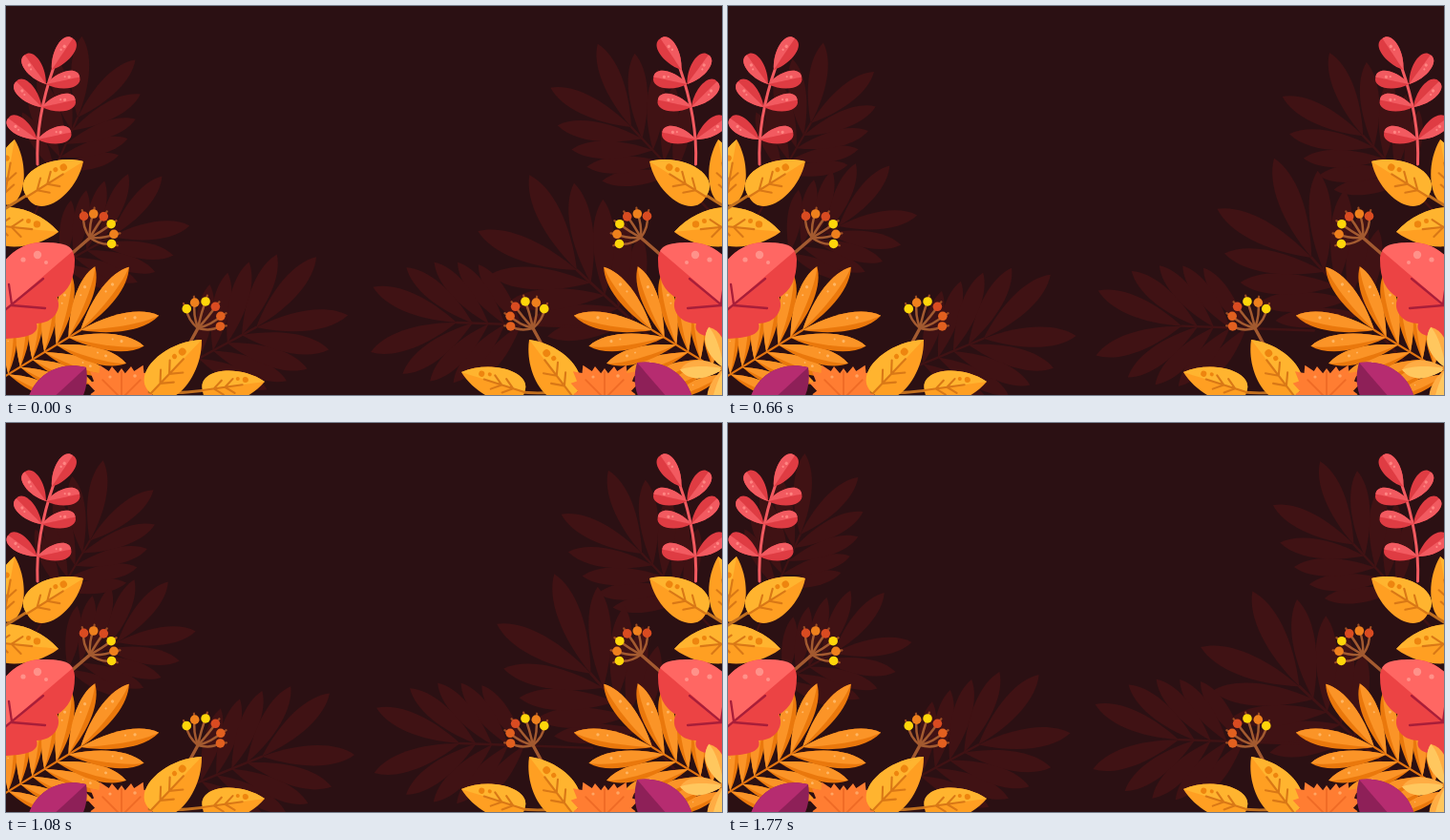
These frames come from a looping animation (750x408 px, 1.8 s). An HTML page with a canvas:

```html
<!DOCTYPE html>
<html lang="en">
<head>
<meta charset="utf-8">
<title>Autumn leaves</title>
<style>
html, body { margin: 0; width: 100%; height: 100%; overflow: hidden; background: #2b1013; }
canvas { display: block; width: 750px; height: 408px; }
</style>
</head>
<body>
<canvas id="stage" width="750" height="408"></canvas>
<script>
const W = 750, H = 408, LOOP = 1800, STEP = 30;
const RAD = Math.PI / 180;
const stage = document.getElementById('stage').getContext('2d');
const front = document.createElement('canvas');
front.width = W;
front.height = H;
let g = stage;

// Leaf outlines: where the two curve handles sit along the length
const LANCE = [0.42, 0.8], OVATE = [-0.04, 0.62], BLADE = [0.25, 0.75], DROP = [0.42, 1.02];

const RED = '#d94b21', RUST = '#e2601f', ORANGE = '#ee801d', YELLOW = '#ffd60a';
const CORAL = { light: '#f25a60', dark: '#df3c43', spot: '#ff8582', cut: 0 };
const GOLD = { light: '#ffb42f', dark: '#ff9f22', spot: '#ee850f', cut: 0 };
const PUMPKIN = { light: '#fb9427', dark: '#ea780c', spot: '#ffb663', cut: 0.4, stem: '#e37410' };
const CREAM = { light: '#ffc75e', dark: '#ffac43', cut: 0.3 };
const PLUM = { light: '#b62c70', dark: '#8e2058', cut: 0 };
const SHADOW = { dark: '#401214', stem: '#401214' };

function stroke(path, color, width) {
  g.strokeStyle = color;
  g.lineWidth = width;
  g.lineCap = g.lineJoin = 'round';
  g.stroke(new Path2D(path));
}

function fill(path, color) {
  g.fillStyle = color;
  g.fill(new Path2D(path));
}

function dot(x, y, r, color) {
  g.beginPath();
  g.arc(x, y, r, 0, 7);
  g.fillStyle = color;
  g.fill();
}

// Draws with the origin at (x, y) and the x axis along the angle
function at(x, y, angle, draw) {
  g.save();
  g.translate(x, y);
  g.rotate(angle);
  draw();
  g.restore();
}

function mirrored(sum, draw) {
  draw();
  g.save();
  g.translate(sum, 0);
  g.scale(-1, 1);
  draw();
  g.restore();
}

// Leaf along +x; the lit part covers one side and a share (cut) of the other
function blade(L, w, [a, b], { light, dark, spot, cut }, lit = -1) {
  const h = w * 0.667;
  const shape = (up, down) => `M0 0C${a * L} ${up} ${b * L} ${up} ${L} 0C${b * L} ${down} ${a * L} ${down} 0 0Z`;
  fill(shape(-h, h), dark);
  if (light) fill(shape(lit * h, -lit * h * cut), light);
  if (spot) {
    dot(L * 0.7, lit * w * 0.14, w * 0.09, spot);
    dot(L * 0.58, lit * w * 0.2, w * 0.06, spot);
  }
}

function leaf(x0, y0, x1, y1, w, shape, tone, lit) {
  const L = Math.hypot(x1 - x0, y1 - y0);
  at(x0, y0, Math.atan2(y1 - y0, x1 - x0), () => blade(L, w, shape, tone, lit));
}

function goldLeaf(x0, y0, x1, y1, w, lit = -1) {
  const L = Math.hypot(x1 - x0, y1 - y0);
  at(x0, y0, Math.atan2(y1 - y0, x1 - x0), () => {
    blade(L, w, OVATE, GOLD, lit);
    let veins = `M0 0H${L * 0.64}`;
    for (const s of [0.18, 0.36])
      for (const side of [-1, 1]) veins += `M${L * s} 0l${L * 0.14} ${side * w * 0.22}`;
    stroke(veins, '#d97816', 2.1);
  });
}

// Pairs of leaflets from the tip of the stem (origin) back along it,
// opening wider and getting shorter
function frond(size, stem, pairs, tone) {
  g.scale(size, size);
  stroke(`M${-stem} 0H0`, tone.stem, 2.4);
  for (let i = pairs - 1; i >= 0; i--) {
    const spread = (55 - 34 * 0.5 ** i) * RAD, L = 96 - 4.5 * i;
    for (const side of [-1, 1])
      at(-17 * i, 0, side * spread, () => blade(L, L * 0.22, LANCE, tone));
  }
}

// Each frond either turns about its stem's foot or slides
const TURN = 8 * RAD;
const fronds = [
  { x: 75, y: 117, angle: -66, size: 0.89, stem: 144, turn: TURN },
  { x: 110, y: 242, angle: -29, size: 0.865, stem: 130, dx: 8, dy: -15 },
  { x: 262, y: 337, angle: -28.5, size: 1.01, stem: 126, turn: TURN },
  { x: 655, y: 127, angle: -133, size: 0.98, stem: 140, dx: 14, dy: 12.5 },
  { x: 598, y: 277, angle: -137.5, size: 1.16, stem: 157, turn: TURN },
  { x: 472, y: 332, angle: -178, size: 0.99, stem: 140, dx: 4.5, dy: 5 }
];

function sway({ x, y, angle, size, stem, turn = 0, dx = 0, dy = 0 }, p) {
  const reach = stem * size;
  at(x + dx * p, y + dy * p, angle * RAD, () => {
    g.translate(-reach, 0);
    g.rotate(turn * p);
    g.translate(reach, 0);
    frond(size, stem, 5, SHADOW);
  });
}

function twig() {
  stroke('M33 166Q31 118 50 64', CORAL.light, 3);
  leaf(48, 67, 70, 34, 19, DROP, CORAL);
  for (let i = 0; i < 3; i++) {
    const x = 42 - 4.5 * i, y = 82 + 24 * i + 5 * i * (i - 1);
    at(x, y, (-126 - 9 * i) * RAD, () => blade(38, 18, DROP, CORAL));
    at(x, y, -12 * RAD, () => blade(36, 18, DROP, CORAL));
  }
}

function berries(x, y, foot, from, to, bulge, colors) {
  stroke(`M${foot}L${x} ${y}`, '#a35a30', 3.4);
  colors.forEach((color, i) => {
    const k = i / (colors.length - 1), a = (from + (to - from) * k) * RAD;
    const r = 23.5 + bulge * Math.sin(Math.PI * k), mid = a + (0.5 - k) * 0.7;
    const cx = Math.cos(a), cy = -Math.sin(a);
    const bx = x + r * cx, by = y + r * cy;
    stroke(`M${x} ${y}Q${x + r * 0.6 * Math.cos(mid)} ${y - r * 0.6 * Math.sin(mid)} ${bx} ${by}`, '#a35a30', 2.5);
    stroke(`M${bx} ${by}l${cx * 6.5} ${cy * 6.5}`, '#9b4c23', 2.2);
    dot(bx, by, 4.8, color);
  });
}

function goldBranch() {
  goldLeaf(-3, 208, 9, 140, 34);
  goldLeaf(-22, 229, 55, 237, 41);
  stroke('M-2 213Q10 206 24 197', '#c2701f', 3.2);
  goldLeaf(22, 200, 81, 163, 41);
}

function redLeaf() {
  fill('M-6 274C4 258 20 247 40 248C61 249 72 253 72 266C72 286 66 299 53 306C59 315 52 333 32 333C36 346 17 349 -6 349Z', '#ec4344');
  fill('M-6 274C4 258 20 247 40 248C59 248 67 251 70 257Q38 284 -6 323Z', '#ff6763');
  stroke('M-6 323L39 286M6 313L3 292M6 314L41 317', '#a81e39', 2.3);
  dot(33, 261, 4.2, '#ff928a');
  dot(18, 266, 2.6, '#ff928a');
  dot(42, 269, 2, '#ff928a');
}

// Upper half of a jagged star whose lobes reach out at the diagonals
function maple(x, y) {
  const n = 22;
  let path = '', veins = '';
  for (let k = 0; k <= n; k++) {
    const a = Math.PI * (1 + k / n);
    const r = (38 - 6 * Math.cos(4 * a)) * (k % 2 ? 1 : 0.82);
    path += `${k ? 'L' : 'M'}${x + r * Math.cos(a)} ${y + r * Math.sin(a)}`;
  }
  for (const a of [-135, -90, -45])
    veins += `M${x} ${y}l${28 * Math.cos(a * RAD)} ${28 * Math.sin(a * RAD)}`;
  fill(path + 'Z', '#ff7d32');
  stroke(veins, '#ef6a25', 1.8);
  dot(x + 14, y - 24, 1.8, '#ffa563');
  dot(x - 12, y - 23, 1.6, '#ffa563');
}

function flower(x, y) {
  for (let i = 0; i < 5; i++)
    at(x, y, (178 + 72 * i) * RAD, () => blade(46, 19, LANCE, CREAM));
  dot(x, y, 3.5, '#e98d28');
}

function bottomLeft() {
  leaf(22, 436, 84, 379, 48, BLADE, PLUM);
  maple(121, 412);
  stroke('M150 405Q180 407 210 403', '#c2701f', 2.8);
  goldLeaf(152, 406, 205, 350, 43);
  goldLeaf(206, 403, 271, 394, 34);
}

function bottomRight() {
  flower(752, 380);
  stroke('M538 405Q560 407 590 404', '#c2701f', 2.8);
  goldLeaf(593, 409, 548, 350, 43, 1);
  goldLeaf(543, 405, 477, 384, 34, 1);
  maple(627, 412);
  leaf(718, 440, 661, 374, 50, BLADE, PLUM, 1);
}

function paintFront() {
  g = front.getContext('2d');
  mirrored(755.5, twig);
  mirrored(753, () => berries(88, 243, '65 263', 106, -16, 3, [RED, ORANGE, RED, YELLOW, ORANGE, YELLOW]));
  mirrored(755, goldBranch);
  mirrored(755, () => at(78, 340, -31.5 * RAD, () => frond(0.87, 125, 7, PUMPKIN)));
  mirrored(755, redLeaf);
  mirrored(753, () => berries(201, 338, '189 360', 120, 5, 6, [YELLOW, ORANGE, YELLOW, RED, RUST, RUST]));
  bottomLeft();
  bottomRight();
  g = stage;
}

function draw(now) {
  const t = Math.floor(now % LOOP / STEP) * STEP;
  const p = 1 - Math.abs(1 - t / (LOOP / 2));
  g.fillStyle = '#2b1013';
  g.fillRect(0, 0, W, H);
  for (const f of fronds) sway(f, p);
  g.drawImage(front, 0, 0);
}

paintFront();
const start = performance.now();
function tick() {
  draw(performance.now() - start);
  requestAnimationFrame(tick);
}
tick();
</script>
</body>
</html>
```
